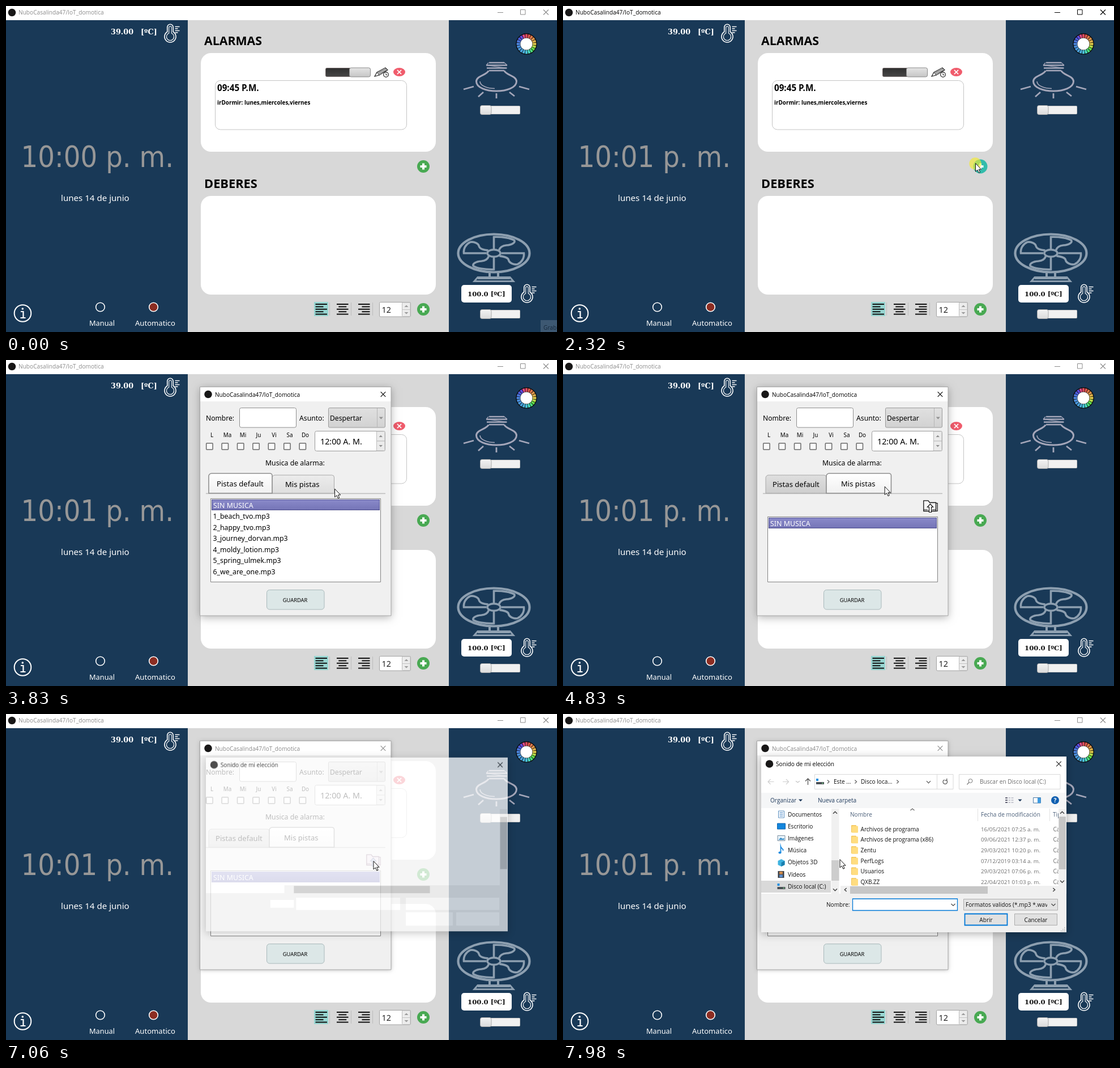
An HTML page with a canvas that plays this animation: 973x575 px, repeating every 8 s.

```html
<!DOCTYPE html>
<html lang="es">
<head>
<meta charset="utf-8">
<title>IoT_domotica</title>
<style>
html, body { margin: 0; width: 100%; height: 100%; overflow: hidden; background: #fff; }
canvas { display: block; width: 973px; height: 575px; }
</style>
</head>
<body>
<canvas id="stage" width="973" height="575"></canvas>
<script>
const W = 973, H = 575, LOOP = 8000;
const screen = document.getElementById('stage').getContext('2d');
const layerCanvas = document.createElement('canvas');
layerCanvas.width = W;
layerCanvas.height = H;
const layer = layerCanvas.getContext('2d');
let g = screen;

const NOTO = '"Noto Sans", sans-serif';
const OPEN = '"Open Sans", sans-serif';
const SERIF = '"DejaVu Serif", serif';
const CLOCK = '"DejaVu Sans Condensed", "Noto Sans", sans-serif';
const APP = 'NuboCasalinda47/IoT_domotica';
const NAVY = '#193957', GREY = '#8c8c8c';

// ---------- drawing helpers ----------
function box(x, y, w, h, fill, stroke, r = 0, lw = 1) {
  g.beginPath();
  g.roundRect(x, y, w, h, r);
  if (fill) { g.fillStyle = fill; g.fill(); }
  if (stroke) { g.strokeStyle = stroke; g.lineWidth = lw; g.stroke(); }
}
function txt(s, x, y, size, color = '#000', font = NOTO, align = 'left', weight = 400) {
  g.font = `${weight} ${size}px ${font}`;
  g.fillStyle = color;
  g.textAlign = align;
  g.fillText(s, x, y);
}
function path(d, stroke, lw = 1, fill) {
  const p = new Path2D(d);
  if (fill) { g.fillStyle = fill; g.fill(p); }
  if (stroke) { g.strokeStyle = stroke; g.lineWidth = lw; g.stroke(p); }
}
function oval(x, y, rx, ry, fill, stroke, lw = 1) {
  g.beginPath();
  g.ellipse(x, y, rx, ry, 0, 0, Math.PI * 2);
  if (fill) { g.fillStyle = fill; g.fill(); }
  if (stroke) { g.strokeStyle = stroke; g.lineWidth = lw; g.stroke(); }
}
const disc = (x, y, r, fill, stroke, lw) => oval(x, y, r, r, fill, stroke, lw);
function shade(y, h, top, bottom) {
  const s = g.createLinearGradient(0, y, 0, y + h);
  s.addColorStop(0, top);
  s.addColorStop(1, bottom);
  return s;
}
const cross = (x, y, r, color, lw = 1.1) =>
  path(`M${x - r} ${y - r}L${x + r} ${y + r}M${x + r} ${y - r}L${x - r} ${y + r}`, color, lw);
const tri = (x, y, w, h, color) => path(`M${x - w} ${y}h${2 * w}l${-w} ${h}z`, null, 0, color);
// chevrons: down for d > 0, up for d < 0
const chevY = (x, y, d, color, lw = 1.2) => path(`M${x - 3.5} ${y - d / 2}l3.5 ${d}l3.5 ${-d}`, color, lw);
const chevX = (x, y, d, color, lw = 1.1) => path(`M${x - d / 2} ${y - 3}l${d} 3l${-d} 3`, color, lw);
function at(x, y, draw) {
  g.save();
  g.translate(x, y);
  draw();
  g.restore();
}
function clip(x, y, w, h, draw) {
  g.save();
  g.beginPath();
  g.rect(x, y, w, h);
  g.clip();
  draw();
  g.restore();
}

// ---------- icons ----------
function thermometer(x, y) {
  at(x, y, () => {
    path('M6.8 13.5V5.4a5.2 5.2 0 0 1 10.4 0V13.5a10 10 0 1 1-10.4 0z', '#fff', 1.6);
    path('M9.7 16V6a2.3 2.3 0 0 1 4.6 0V16a6.6 6.6 0 1 1-4.6 0z', '#fff', 1.1);
    path('M20.5 4.5h8M20.5 8h5M20.5 11.5h8M20.5 15h5', '#fff', 1.3);
  });
}
const HUES = [352, 5, 18, 30, 42, 52, 75, 110, 140, 170, 190, 198, 204, 208, 212, 216, 222, 232, 250, 335];
function colorWheel() {
  disc(919, 67, 18.7, '#0a0a0a');
  const step = Math.PI * 2 / HUES.length;
  HUES.forEach((hue, i) => {
    const a = i * step - Math.PI / 2;
    g.beginPath();
    g.arc(919, 67, 14.2, a - step * .41, a + step * .41);
    g.strokeStyle = `hsl(${hue}, 68%, 58%)`;
    g.lineWidth = 6.4;
    g.stroke();
  });
  disc(919, 67, 10.6, '#fff');
}
function bulb() {
  const c = '#a4a6b9';
  path('M853 100h27M848 104.5h37M849 109.5h35M853 114h27', c, 2.4);
  path('M848 104.5l37 5M852 100l-4 4.5M880 100l5 4.5', c, 1.2);
  path('M852 114C851 121 830.5 123 830.5 133C830.5 144 848 150 866 150C884 150 901.5 144 901.5 133C901.5 123 881 121 880 114', c, 3);
  path('M837 133C837 141 851 145.5 863 145.5', c, 1.6);
  path('M808 147L826 142M906 142L924 147M834 160L843 152M866 154V163M889 152L898 159', c, 2.8);
}
function fan() {
  const c = '#8d9fb0';
  const blade = new Path2D('M0 -13V-53C16 -54 30 -49 36 -42C39 -36 32 -27 22 -26C15 -25 11 -20 9 -10');
  oval(861.5, 436, 63, 33.5, null, c, 4.2);
  const blades = new Path2D();
  for (let i = 0; i < 4; i++)
    blades.addPath(blade, new DOMMatrix().translate(861.5, 436).scale(1, .54).rotate(i * 90));
  g.strokeStyle = c;
  g.lineWidth = 3.6;
  g.stroke(blades);
  oval(861.5, 436, 11.5, 6.2, NAVY, c, 3.4);
  path('M854 470V478M869 470V478', c, 4);
  path('M833 478.5H890L896 485.5H827z', c, 3);
  path('M833 481H890', c, 2);
}
function slider(y) {
  box(846, y + 1.5, 61.5, 14, '#f1f1f1', '#c9c9c9', 1);
  box(837.5, y + .5, 19.5, 16, shade(y, 16, '#f4f4f4', '#dcdcdc'), '#a9a9a9', 3);
}
function plus(x, y, color, r = 11) {
  disc(x, y, r, color);
  path(`M${x - 5.5} ${y}h11M${x} ${y - 5.5}v11`, '#fff', 4);
}
function pencil() {
  path('M651 124l4-7l15-8l4 4l-15 9z', '#222', 1.2, '#fff');
  path('M655 117l4 5M657 118l14-7M658 120l14-7', '#222', 1);
  disc(671, 121, 4.3, '#fff', '#222', 1.2);
  path('M671 118.5v3h2.2', '#222', 1);
}
function alignIcon(x, side) {
  for (let i = 0; i < 5; i++) {
    const w = i % 2 ? 14 : 20.5;
    box(x + (20.5 - w) * side, 525 + i * 4.4, w, 2, '#111');
  }
}
function folderUp(hover) {
  at(636, 247, () => {
    const ink = hover ? '#8a6f86' : '#111';
    path('M.8 19.5V1.2H9L11.5 4.5H22.5V19.5z', ink, 1.3, hover ? '#eadfea' : '#f6f6f6');
    path('M22.5 5.5h2.7V19.5H18M.8 17h7M16 17h7', ink, 1.2);
    path('M12.5 7l-5 5.5h3V21.5h4V12.5h3z', hover ? '#7d86ad' : ink, 1.2, hover ? '#b9c2e0' : '#fff');
  });
}
function cursor(x, y) {
  at(x, y, () => {
    g.lineJoin = 'round';
    path('M.5 .5V15L3.8 12L6.3 17.2L8.6 16.2L6.2 11.2H10.6z', '#111', 1, '#fff');
  });
}
const clickMark = (x, y) => disc(x, y, 10.7, 'rgba(246,236,40,.62)');

// ---------- main window ----------
function mainWindow(t) {
  const active = t >= 2320 && t < 2540;
  const hover = t >= 1585 && t < 2540;
  const ink = active ? '#000' : GREY;
  box(0, 0, W, 25, '#fff');
  disc(10.5, 11.5, 6.8, '#181717');
  txt(APP, 22, 15, 10.15, ink, OPEN);
  path('M868 11.5h10', ink);
  box(908.5, 6.5, 8.5, 8.5, null, ink);
  cross(953.5, 11, 4.5, ink);

  box(0, 25, W, H - 25, NAVY);
  box(321, 25, 461, H - 25, '#d8d8d8');

  txt('39.00', 185, 49.5, 12.8, '#fff', SERIF, 'left', 700);
  txt('[ºC]', 238, 49.5, 12.8, '#fff', SERIF, 'left', 700);
  thermometer(278, 32);
  txt(t < 410 ? '10:00 p. m.' : '10:01 p. m.', 26.5, 284, 52, '#979797', CLOCK);
  txt('lunes 14 de junio', 97, 344, 15.1, '#fff');
  disc(29.5, 542, 14.8, null, '#fff', 2);
  path('M26 539h4.5v10.5M25.5 550h9', '#fff', 2.2);
  disc(29.3, 534, 1.8, '#fff');
  disc(166.5, 531, 7.8, null, '#fff', 1.6);
  disc(260.5, 531, 7.8, '#8c2d22', '#fff', 1.6);
  txt('Manual', 169.5, 564, 12.8, '#fff', NOTO, 'center');
  txt('Automatico', 263.5, 564, 13.1, '#fff', NOTO, 'center');

  txt('ALARMAS', 350, 69, 21.3, '#000', NOTO, 'left', 700);
  txt('DEBERES', 350, 321, 21.8, '#000', NOTO, 'left', 700);
  box(344, 83, 415, 174, '#fff', null, 18);
  box(344, 335, 415, 174, '#fff', null, 18);
  box(564.5, 109.5, 50, 15, shade(109, 15, '#2e2e2e', '#454545'), '#6e6464', 2);
  box(606.5, 109, 37, 16, shade(109, 16, '#e4e4e4', '#c6c6c6'), '#8a8a8a', 3);
  pencil();
  oval(694.5, 116.5, 10.5, 7.5, '#f05c6c');
  cross(694.5, 116.5, 3.6, '#fff', 1.6);
  box(369.5, 131.5, 338, 86.5, '#fff', '#c4c4c4', 9);
  txt('09:45 P.M.', 373, 150, 15.2, '#000', NOTO, 'left', 700);
  txt('irDormir: lunes,miercoles,viernes', 373, 174, 9.9, '#000', NOTO, 'left', 700);
  plus(737, 283, hover ? '#33bcab' : '#48a952', hover ? 12.5 : 11);

  box(544, 522, 25, 25, '#97d5d1');
  alignIcon(546.5, 0);
  alignIcon(584, .5);
  alignIcon(622, 1);
  path('M571.5 523v23M609.5 523v23M647.5 523v23', '#bdbdbd');
  box(659.5, 522.5, 55, 25.5, '#fff', '#a3a3a3', 2);
  box(699.5, 523, 14.5, 24.5, '#ececec', '#bcbcbc', 1);
  path('M700 535.5h14', '#c4c4c4');
  tri(707, 531, 3.5, -3.5, '#9b9b9b');
  tri(707, 540, 3.5, 3.5, '#9b9b9b');
  txt('12', 663.5, 541, 14.4, '#111', OPEN);
  plus(737, 535, '#48a952');

  colorWheel();
  bulb();
  slider(175);
  fan();
  box(804, 492, 89, 31, '#fff', null, 5);
  txt('100.0 [ºC]', 815, 512, 11.7, '#111', SERIF, 'left', 700);
  thermometer(908, 491);
  slider(535);

  if (t < 70) {
    box(944, 554, 29, 21, '#3d5872');
    txt('Grab', 949, 570.5, 10.2, '#16283b', OPEN);
  }
}

// ---------- alarm dialog ----------
function frame(x, y, w, h, blur, alpha) {
  g.save();
  g.shadowColor = `rgba(0,0,0,${alpha})`;
  g.shadowBlur = blur;
  g.shadowOffsetY = blur / 5;
  box(x, y, w, h, '#f0f0f0');
  g.restore();
}
function spinArrows(x, y, w, h) {
  box(x, y, w, h / 2, '#ebebeb', '#bdbdbd');
  box(x, y + h / 2, w, h / 2, '#ebebeb', '#bdbdbd');
  tri(x + w / 2, y + h / 4 + 1.5, 3.2, -3.5, '#8f8f8f');
  tri(x + w / 2, y + h * .75 - 1.5, 3.2, 3.5, '#8f8f8f');
}
function tab(x, w, active, hover) {
  const y = active ? 200 : 203;
  const fill = active ? shade(y, 36, '#fff', '#f0f0f0')
    : hover ? shade(y, 33, '#ececec', '#dedede') : shade(y, 33, '#dfdfdf', '#cdcdcd');
  box(x, y, w, 235 - y, fill, active ? '#8f8f8f' : '#a8a8a8', [5, 4, 0, 0], active ? 1.6 : 1);
}
function selectedRow(y, focused) {
  box(363, y, 297, 19, shade(y, 19, '#8a8aca', '#7474b6'));
  if (focused) {
    g.setLineDash([1, 1]);
    box(363.5, y + .5, 296, 18, null, '#20205a');
    g.setLineDash([]);
  }
  txt('SIN MUSICA', 366, y + 14.5, 12.4, '#fff');
}
function alarmDialog(t) {
  const own = t >= 4310, inactive = t >= 6600;
  const ink = inactive ? GREY : '#000';
  frame(343, 47, 337, 404, inactive ? 7 : 14, inactive ? .28 : .3);
  box(343, 47, 337, 26, '#fff');
  box(342.5, 47.5, 337.5, 403.5, null, '#a6a6a6');
  disc(357, 60.5, 6.8, '#181717');
  txt(APP, 369, 64.5, 10.1, ink, OPEN);
  cross(666, 60.5, 4.3, ink);

  txt('Nombre:', 353, 107, 12.1);
  box(412.5, 84.5, 100, 34.5, '#fff', '#8d8d8d', 3);
  txt('Asunto:', 518, 107, 12.2);
  box(569.5, 84.5, 100, 34.5, shade(84, 35, '#e0e0e0', '#d2d2d2'), '#9a9a9a', 2);
  path('M655.5 85v34', '#b5b5b5');
  tri(662.3, 100.5, 3.5, 4, '#8f8f8f');
  txt('Despertar', 572, 107, 12.1);

  ['L', 'Ma', 'Mi', 'Ju', 'Vi', 'Sa', 'Do'].forEach((d, i) => {
    txt(d, 363.5 + i * 27.5, 136, 9.9, '#000', NOTO, 'center');
    box(353.7 + i * 27.4, 146.7, 11.4, 11.4, '#f9f9f9', '#6a6a6a', 1, 1.5);
  });
  box(545.5, 125.5, 124, 35, '#fff', '#9a9a9a', 3);
  spinArrows(654.5, 126, 14.5, 34);
  txt('12:00 A. M.', 555, 149, 14.3);
  txt('Musica de alarma:', 458, 186, 12.25);

  path('M353 235.5H670', '#bdbdbd', 1.6);
  if (own) {
    tab(358, 107, false);
    tab(465, 114.5, true);
    txt('Pistas default', 370, 223.5, 13.1);
    txt('Mis pistas', 491, 222.5, 13);
    folderUp(t >= 5750);
    box(361.5, 276.5, 300, 115, '#fff', '#828282');
    selectedRow(278, t < 6390);
  } else {
    tab(470, 109.5, false, t >= 3700);
    tab(358, 112, true);
    txt('Pistas default', 372, 222.5, 13.1);
    txt('Mis pistas', 493, 223.5, 13);
    box(361.5, 244.5, 300, 147, '#fff', '#828282');
    selectedRow(246, true);
    const tracks = ['beach_tvo', 'happy_tvo', 'journey_dorvan', 'moldy_lotion', 'spring_ulmek', 'we_are_one'];
    tracks.forEach((s, i) => txt(`${i + 1}_${s}.mp3`, 365.5, 280 + i * 19.5, 12.3));
  }
  box(460.5, 405.5, 101.5, 34.5, '#dce7e7', '#a9b9bb', 5);
  txt('GUARDAR', 510.5, 427, 9.3, '#000', NOTO, 'center');
}

// ---------- file dialog ----------
function sideIcon(i) {
  if (i === 0) {
    box(2, 0, 10, 12, '#fff', '#5a8fc0');
    path('M4 3h6M4 6h6M4 9h6', '#3a7fc4', 1.2);
  } else if (i === 1) {
    box(0, 1, 14, 10, '#1486dc', '#0b63ad');
  } else if (i === 2) {
    box(.5, 1.5, 13, 9, '#e8f3fb', '#7b8fa0');
    path('M2 9l4-4l3 2l3-1v3z', null, 0, '#3a8fca');
  } else if (i === 3) {
    path('M6 10V0c1 4 5 3 4 7', '#1a8ae0', 1.8);
    oval(4.5, 10.5, 2.6, 2, '#1a8ae0');
  } else if (i === 4) {
    path('M1 3l6-3l6 3v7l-6 3l-6-3z', null, 0, '#3fb3e0');
    path('M7 6l6-3v7l-6 3z', null, 0, '#1a7fae');
  } else if (i === 5) {
    box(1, 0, 11, 12, '#3b3f46');
    box(3.5, 1, 6, 4.5, '#d08a4a');
    box(3.5, 6.5, 6, 4.5, '#5b8fd0');
  } else drive();
}
function drive() {
  box(0, 1, 4, 4, '#1d8fe0');
  box(0, 7, 14, 4, '#4a4f55');
  box(10, 8.3, 2.5, 1.4, '#7fe08a');
}
const folder = (x, y) => {
  box(x, y, 9, 13, '#f2c458', null, 1);
  box(x + 1, y + 1.5, 11, 12, '#ffdd80', null, 1);
};
function scrollThumbs() {
  box(875, 167, 13, 136, '#f0f0f0');
  box(490, 303, 398, 14, '#f0f0f0');
  box(875.5, 181, 12.5, 93, '#c6c6c6');
  box(507, 304, 243, 13, '#c6c6c6');
}
function fileDialog(loaded, hoverRow) {
  frame(350, 75, 539, 310, 14, .3);
  box(350, 75, 539, 242, '#fff');
  disc(364.5, 88, 6.8, '#181717');
  txt('Sonido de mi elección', 376, 92, 10.15, '#000', OPEN);
  cross(875.5, 88, 4.3, '#222');
  scrollThumbs();
  if (!loaded) {
    box(465, 329, 42, 14, '#fff');
    box(511, 325, 186, 22, '#fff');
    box(707, 325, 167, 22, '#fff');
    box(707, 351, 84, 24, '#fff');
    box(797, 351, 77, 24, '#fff');
    return;
  }
  const label = (s, x, y, color = '#111', align) => txt(s, x, y, 10.1, color, OPEN, align);

  path('M372.5 119.5h-10M366.5 115l-4.5 4.5l4.5 4.5M388 119.5h10M394 115l4.5 4.5l-4.5 4.5', '#cfcfcf', 1.2);
  chevY(414.5, 119.5, 2.5, '#c4c4c4');
  path('M432.5 125v-11M428 118.5l4.5-4.5l4.5 4.5', '#555', 1.3);
  box(444.5, 106.5, 244.5, 26, '#fff', '#d9d9d9');
  path('M660.5 107v25', '#d9d9d9');
  at(447, 113, drive);
  [468.5, 517, 591].forEach(x => chevX(x, 119.5, 3.2, '#555'));
  label('Este ...', 478, 123);
  label('Disco loca...', 526, 123);
  chevY(645.5, 120, 3.6, '#555');
  path('M677.5 117a3.8 3.8 0 1 1-4-.9M677.8 113.8v3.4h-3.4', '#555', 1.2);
  box(699.5, 106.5, 178.5, 26, '#fff', '#d9d9d9');
  disc(719.5, 118, 3.4, null, '#777');
  path('M717 120.5l-3.5 4', '#777', 1.2);
  label('Buscar en Disco local (C:)', 736, 123, '#6d6d6d');

  box(350, 139, 539, 27, '#f5f6f7');
  label('Organizar', 366, 156, '#1e395b');
  tri(419.5, 150.5, 3.5, 3.8, '#1e395b');
  label('Nueva carpeta', 450, 156, '#1e395b');
  path('M781 148h4M781 152h4M781 156h4', '#667', 1.8);
  path('M786.5 148h3.5M786.5 152h3.5M786.5 156h3.5M791.5 148h4M791.5 152h4M791.5 156h4', '#99a', 1.2);
  tri(807, 150.5, 3.5, 3.8, '#1e395b');
  box(830.5, 147.5, 13, 9.5, '#fff', '#4a7ba8');
  box(838, 148, 5.5, 9, '#3f9be0');
  disc(869, 152, 7, '#0f5fb0');
  txt('?', 869, 155.8, 10.5, '#fff', OPEN, 'center', 700);

  box(350, 294, 123, 21, '#d9d9d9');
  ['Documentos', 'Escritorio', 'Imágenes', 'Música', 'Objetos 3D', 'Vídeos', 'Disco local (C:)'].forEach((s, i) => {
    const y = 176.8 + i * 21.2;
    at(378.5, Math.round(y - 6), () => sideIcon(i));
    label(s, 397, y + 3.8);
  });
  box(474, 167, 13.5, 150, '#f0f0f0');
  box(474, 258, 13.5, 36, '#cdcdcd');
  chevY(480.5, 174, -3.4, '#444', 1.5);
  chevY(480.5, 310, 3.4, '#444', 1.5);

  label('Nombre', 507, 181, '#4c607a');
  chevY(617, 168.5, -3, '#666');
  path('M732.5 167v22M859.5 167v22', '#e2e2e2');
  label('Fecha de modificación', 738, 181, '#4c607a');
  clip(490, 167, 385, 136, () => {
    label('Tipo', 865, 181, '#4c607a');
    const rows = [
      ['Archivos de programa', '16/05/2021 07:25 a. m.'],
      ['Archivos de programa (x86)', '09/06/2021 12:37 p. m.'],
      ['Zentu', '29/03/2021 10:20 p. m.'],
      ['PerfLogs', '07/12/2019 03:14 a. m.'],
      ['Usuarios', '29/03/2021 07:06 p. m.'],
      ['QXB.ZZ', '22/04/2021 01:03 p. m.']
    ];
    rows.forEach(([name, date], i) => {
      const y = 203 + i * 18.65;
      if (i === hoverRow) box(505, y - 9, 370, 18, '#e5f3ff');
      folder(509, y - 7);
      label(name, 525.5, y + 3.7);
      txt(date, 738, y + 3.7, 9.8, '#6d6d6d', OPEN);
      label('Carpeta', 865.5, y + 3.7, '#6d6d6d');
    });
  });
  chevY(881.5, 174, -3.4, '#444', 1.5);
  chevY(881.5, 295.5, 3.4, '#444', 1.5);
  chevX(499, 310, -3.4, '#444', 1.5);
  chevX(867, 310, 3.4, '#444', 1.5);

  label('Nombre:', 465, 339.5);
  box(511.5, 326, 185, 20.5, '#fff', '#0078d7', 0, 1.3);
  chevY(689, 336.5, 3.4, '#444');
  box(707.5, 326.5, 166, 19.5, '#e3e3e3', '#adadad');
  clip(708, 327, 147, 19, () => label('Formatos validos (*.mp3 *.wav', 711, 340));
  chevY(866, 336.5, 3.4, '#444');
  box(709.5, 352.5, 75, 20, '#e1e1e1', '#0078d7', 0, 1.8);
  label('Abrir', 747, 366.5, '#111', 'center');
  box(797.5, 352.5, 75, 20, '#e1e1e1', '#adadad');
  label('Cancelar', 835, 366.5, '#111', 'center');
  for (let i = 0; i < 3; i++)
    for (let j = 0; j <= i; j++) box(885 - j * 3, 376 + i * 3, 1.6, 1.6, '#b8b8b8');
}

// ---------- timing ----------
// Fades and grows a window in four short steps.
function openWindow(t, start, cx, cy, draw) {
  const n = Math.floor((t - start) / 70) + 1;
  if (n < 1) return;
  if (n > 3) { draw(); return; }
  const alpha = 1 - .5 ** n, scale = 1 - .045 * (1 - alpha);
  layer.clearRect(0, 0, W, H);
  g = layer;
  draw();
  g = screen;
  g.save();
  g.globalAlpha = alpha;
  g.translate(cx, cy);
  g.scale(scale, scale);
  g.drawImage(layerCanvas, -cx, -cy);
  g.restore();
}

// [start, end, steps, x, y]: the pointer moves to x, y in held steps
const MOVES = [
  [610, 1370, 12, 745, 305],
  [1450, 1720, 5, 728, 277],
  [3210, 3910, 11, 566, 222],
  [4830, 5600, 12, 651, 258],
  [5670, 5920, 4, 647.5, 259],
  [6070, 6070, 1, 648.5, 259],
  [7590, 7980, 7, 488.5, 256]
];
function pointer(t) {
  let x = 985, y = 585;
  for (const [start, end, steps, tx, ty] of MOVES) {
    if (t < start) break;
    const p = t >= end ? 1 : (Math.floor((t - start) / (end - start) * (steps - 1)) + 1) / steps;
    const e = p * p * (3 - 2 * p);
    x += (tx - x) * e;
    y += (ty - y) * e;
  }
  return [x, y];
}

function render(t) {
  g = screen;
  const [x, y] = pointer(t);
  mainWindow(t);
  openWindow(t, 2540, 511, 249, () => alarmDialog(t));
  const row = t >= 7590 && x > 505 ? 3 : -1;
  openWindow(t, 6990, 619, 230, () => fileDialog(t >= 7200, row));
  if (t >= 2320 && t < 2540 || t >= 4310 && t < 4510 || t >= 6390 && t < 6600) clickMark(x, y + 1);
  if (t >= 610) cursor(x, y);
}

const begin = performance.now();
function tick() {
  render((performance.now() - begin) % LOOP);
  requestAnimationFrame(tick);
}
tick();
</script>
</body>
</html>
```
